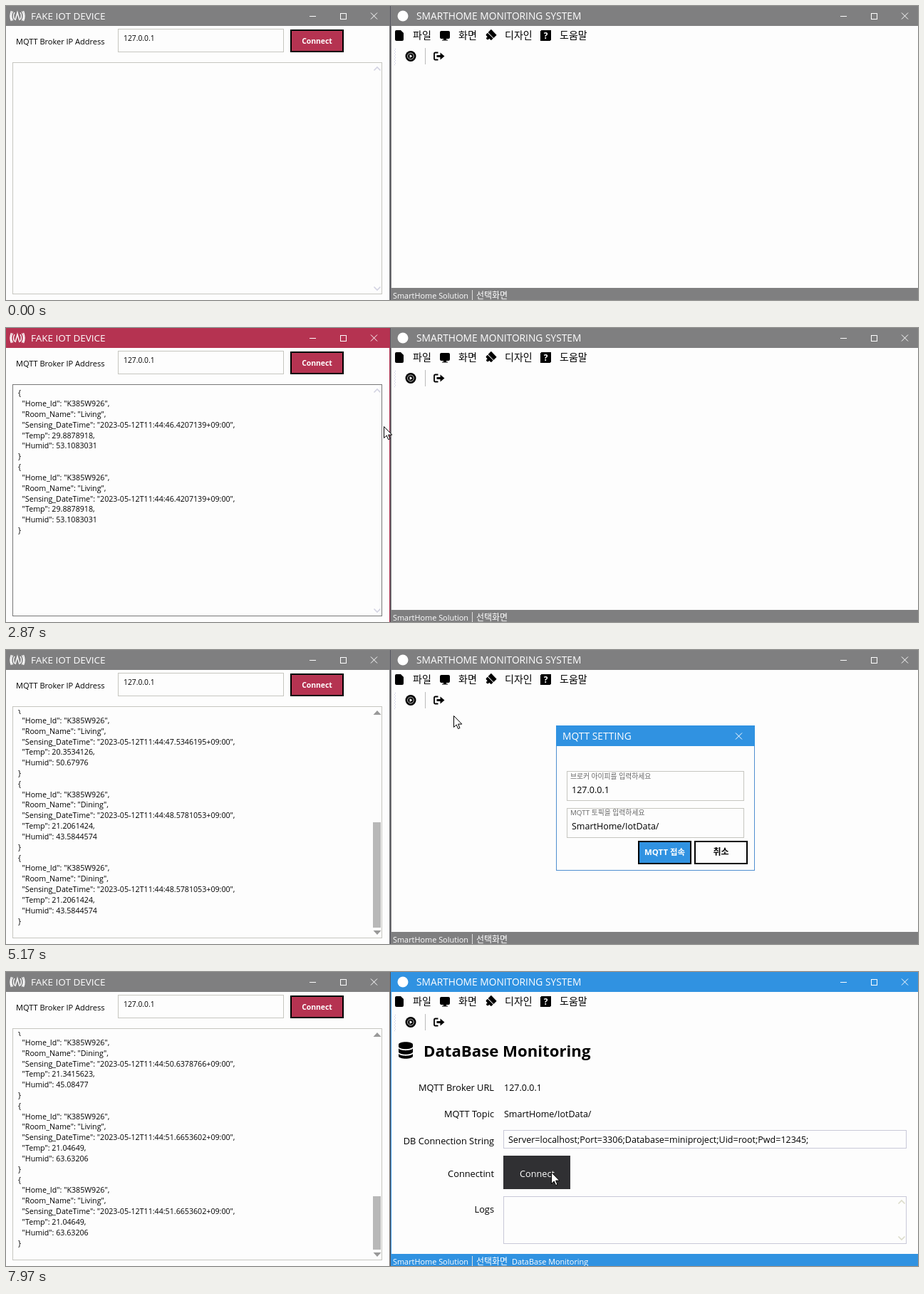
Write an HTML page that moves like this. It is 1280 by 413 pixels and loops after 8000 ms.

```html
<!DOCTYPE html>
<html lang="ko">
<head>
<meta charset="utf-8">
<title>IoT device and monitor</title>
<style>
  html, body { margin: 0; height: 100%; overflow: hidden; background: #fdfdfd; }
  svg { display: block; width: 100vw; height: 100vh; font-family: "Open Sans", "Noto Sans CJK KR", "Noto Sans CJK", sans-serif; }
  text { white-space: pre; }
  rect { shape-rendering: crispEdges; }
  .field { fill: #fdfdfd; stroke: #c6c6c0; }
  .pale { fill: #fdfdfd; stroke: #c9c9d8; }
  .line { fill: none; stroke: #fff; }
  .white { fill: #fff; }
  .title { fill: #fff; font-size: 13.75px; }
  .menu { font-size: 14px; }
  .status { fill: #fff; font-size: 10.9px; }
  .hint { fill: #666; font-size: 9.8px; }
  .form { font-size: 12.8px; text-anchor: end; }
  .value { font-size: 12.5px; }
  .bold { font-weight: 700; text-anchor: middle; }
  .thick { stroke: #000; stroke-width: 2; }
</style>
</head>
<body>
<svg viewBox="0 0 1280 413" preserveAspectRatio="none">
  <defs>
    <clipPath id="logClip"><rect x="10" y="84" width="504" height="319"/></clipPath>
    <pattern id="dots" width="3" height="4" patternUnits="userSpaceOnUse">
      <path d="M0 0h1v1h-1zM2 2h1v1h-1z" fill="#c4c4e0"/>
    </pattern>
    <g id="close"><path class="line" d="M-4.5 -4.5l9 9m0 -9l-9 9"/></g>
    <g id="controls">
      <path class="line" d="M426 14.5h9M469.5 10.5h8v8h-8z" shape-rendering="crispEdges"/>
      <use href="#close" x="516.5" y="14"/>
    </g>
    <g id="play">
      <circle r="7.5"/>
      <circle r="4.4" fill="none" stroke="#fff" stroke-width=".8"/>
      <path class="white" d="M-1.4 -2.4L2.4 0L-1.4 2.4z"/>
    </g>
    <g id="exit">
      <path d="M-1 -5h-4q-1.5 0 -1.5 1.5v7q0 1.5 1.5 1.5h4" fill="none" stroke="#000" stroke-width="1.8"/>
      <path d="M-3 -1.5H2V-5L8 0L2 5V1.5H-3z"/>
    </g>
    <path id="chevron" d="M-4.5 2.5L0 -2L4.5 2.5" fill="none" stroke-width="1.6"/>
    <path id="arrow" d="M-5.5 3L0 -3L5.5 3z" fill="#999"/>
  </defs>

  <!-- device window -->
  <rect id="leftBar" width="539" height="28"/>
  <g class="line" stroke-width="1.4">
    <path d="M13 20L16 9L19 20"/>
    <path d="M12 9q-3 5 0 10M9.5 7.5q-4 6.5 0 13M7.5 7q-3 7 0 14M20 9q3 5 0 10M22.5 7.5q4 6.5 0 13M24.5 7q3 7 0 14"/>
  </g>
  <text class="title" style="font-size:13.5px" x="35" y="19">FAKE IOT DEVICE</text>
  <use href="#controls"/>
  <text x="14" y="54" font-size="11">MQTT Broker IP Address</text>
  <rect class="field" x="157.5" y="32.5" width="232" height="32"/>
  <text x="165" y="49" font-size="10.3">127.0.0.1</text>
  <rect id="connect" class="thick" x="400" y="34" width="73" height="30"/>
  <text class="white bold" x="436.5" y="53" font-size="10.4">Connect</text>
  <rect id="logBox" class="field" x="9.5" y="79.5" width="518" height="325"/>
  <g clip-path="url(#logClip)"><g id="log" font-size="10.66"></g></g>
  <g id="idleScroll" stroke="#d3d3e2">
    <use href="#chevron" x="521" y="88"/>
    <use href="#chevron" transform="translate(521 397) scale(1 -1)"/>
  </g>
  <g id="liveScroll">
    <use href="#arrow" x="521" y="88"/>
    <use href="#arrow" transform="translate(521 397) scale(1 -1)"/>
    <rect id="thumb" x="515" width="11" fill="#b8b8b8"/>
  </g>

  <!-- monitoring window -->
  <rect id="leftEdge" x="538" y="28" width="1" height="385"/>
  <rect x="539" width="1" height="413" fill="#56565f"/>
  <g id="rightBars">
    <rect x="540" width="740" height="28"/>
    <rect x="540" y="28" width="1" height="385"/>
    <rect x="540" y="396" width="740" height="17"/>
  </g>
  <circle class="white" cx="557" cy="14" r="7.5"/>
  <text class="title" x="576" y="19">SMARTHOME MONITORING SYSTEM</text>
  <use href="#controls" x="745"/>
  <text class="status" x="543" y="411">SmartHome Solution</text>
  <rect x="654" y="399" width="1" height="14" fill="#ddd"/>
  <text class="status" style="font-size:12px" x="660" y="411">선택화면</text>

  <rect id="menuHot" x="541.5" y="29.5" width="62" height="25" fill="#dadada" stroke="#a0a0a0"/>
  <path d="M546 36q0 -2 2 -2h6l4 4v9q0 2 -2 2h-8q-2 0 -2 -2z"/>
  <path d="M611 35h10q2 0 2 2v7q0 2 -2 2h-3v1.5h2v1h-8v-1h2v-1.5h-3q-2 0 -2 -2v-7q0 -2 2 -2z"/>
  <g transform="translate(680.5 41) rotate(45)">
    <path d="M-5.5 -6h11v6h-11zM-5.5 1h11v2.5q0 1.5 -1.5 1.5h-2.2v2.5q-1.8 1.5 -3.6 0v-2.5h-2.2q-1.5 0 -1.5 -1.5z"/>
  </g>
  <rect x="750" y="34" width="15" height="15" rx="2"/>
  <text class="white bold" x="757.5" y="46" font-size="12">?</text>
  <g class="menu">
    <text x="571" y="46">파일</text><text x="635" y="46">화면</text>
    <text x="700" y="46">디자인</text><text x="777" y="46">도움말</text>
  </g>
  <rect x="545" y="60" width="3" height="23" fill="url(#dots)"/>
  <use href="#play" x="568" y="70.5"/>
  <rect x="588" y="59" width="1" height="23" fill="#bbb"/>
  <use href="#exit" x="607.5" y="70.5"/>

  <g id="popup">
    <rect x="544" y="57" width="95" height="72" fill="#000" opacity=".18"/>
    <rect x="542.5" y="54.5" width="94" height="72" fill="#fdfdfd" stroke="#8795c4"/>
    <rect x="543" y="55" width="93" height="29" fill="#dadada"/>
    <use href="#play" x="553" y="69"/>
    <text class="menu" x="570" y="74">시작</text>
    <rect x="567" y="91" width="63" height="1" fill="#d4d4d4"/>
    <use href="#exit" x="553" y="113"/>
    <text class="menu" x="570" y="118">끝내기</text>
  </g>

  <g id="dialog">
    <rect x="772.5" y="106.5" width="278" height="203" fill="#fdfdfd" stroke="#4f8fd0"/>
    <rect x="772" y="106" width="279" height="29" fill="#3092e1"/>
    <text class="title" x="781" y="126">MQTT SETTING</text>
    <use href="#close" x="1028.5" y="121"/>
    <rect id="ipBox" class="field" x="787.5" y="170.5" width="248" height="41"/>
    <text class="hint" x="792" y="181">브로커 아이피를 입력하세요</text>
    <text class="value" x="794" y="201">127.0.0.1</text>
    <rect id="topicBox" class="field" x="787.5" y="222.5" width="248" height="41"/>
    <text class="hint" x="792" y="232">MQTT 토픽을 입력하세요</text>
    <text class="value" x="794" y="252">SmartHome/IotData/</text>
    <rect class="thick" x="888" y="269" width="73" height="31" fill="#3092e1"/>
    <text class="white bold" x="924.5" y="288" font-size="11.4">MQTT 접속</text>
    <rect class="thick" x="967" y="269" width="73" height="31" fill="#fdfdfd"/>
    <text class="bold" x="1003.5" y="288" font-size="12">취소</text>
  </g>

  <g id="view">
    <path d="M551 102c0 -5 20 -5 20 0v2.5c0 5 -20 5 -20 0zM551 107.5c3 3.5 17 3.5 20 0v4.5c0 5 -20 5 -20 0zM551 115c3 3.5 17 3.5 20 0v3c0 5 -20 5 -20 0z"/>
    <text x="586" y="119" font-size="22.2" font-weight="700">DataBase Monitoring</text>
    <g class="form">
      <text x="685" y="166.5">MQTT Broker URL</text>
      <text x="685" y="203.5">MQTT Topic</text>
      <text x="685" y="241.5">DB Connection String</text>
      <text x="685" y="287.5">Connectint</text>
      <text x="685" y="337.5">Logs</text>
    </g>
    <text class="value" x="699" y="166.5">127.0.0.1</text>
    <text class="value" x="699" y="203.5">SmartHome/IotData/</text>
    <rect class="pale" x="698.5" y="222.5" width="565" height="25"/>
    <text class="value" x="705" y="240">Server=localhost;Port=3306;Database=miniproject;Uid=root;Pwd=12345;</text>
    <rect id="dbButton" x="698" y="258" width="94" height="47"/>
    <text id="dbLabel" x="745.5" y="287.5" font-size="12.7" text-anchor="middle">Connect</text>
    <rect class="pale" x="698.5" y="315.5" width="565" height="66"/>
    <g stroke="#dcdccb" transform="translate(1257 323)">
      <use href="#chevron"/><use href="#chevron" transform="translate(0 51) scale(1 -1)"/>
    </g>
    <text class="status" x="710" y="411">DataBase Monitoring</text>
  </g>

  <path id="cursor" d="M.5 .5V16.5L4.2 13L6.6 18.6L9 17.6L6.6 12.1H11.8Z" fill="#fff" stroke="#000"/>
</svg>
<script>
const $ = id => document.getElementById(id);
const LOOP = 8000, LINE = 14.83, VIEW = 319, TRACK = 296;
const GRAY = '#7f7f80', BLUE = '#3092e1', RED = '#b53351';

// room, seconds, temperature, humidity; every reading is logged twice
const readings = [
  ['Living', '46.4207139', '29.8878918', '53.1083031'],
  ['Living', '47.5346195', '20.3534126', '50.67976'],
  ['Dining', '48.5781053', '21.2061424', '43.5844574'],
  ['Living', '49.6062393', '21.8915253', '50.6688538'],
  ['Dining', '50.6378766', '21.3415623', '45.08477'],
  ['Living', '51.6653602', '21.04649', '63.63206']
];
const arrival = seconds => 2080 + (seconds - 46.4207139) * 1000;

const blocks = readings.map(([room, seconds, temp, humid], i) => {
  const lines = ['{', '  "Home_Id": "K385W926",', `  "Room_Name": "${room}",`,
    `  "Sensing_DateTime": "2023-05-12T11:44:${seconds}+09:00",`,
    `  "Temp": ${temp},`, `  "Humid": ${humid}`, '}'];
  const group = document.createElementNS('http://www.w3.org/2000/svg', 'g');
  group.innerHTML = [...lines, ...lines].map((line, n) =>
    `<text x="17" y="${84 + 11.3 + (i * 14 + n) * LINE}">${line}</text>`).join('');
  $('log').append(group);
  return group;
});

// time, x, y
const path = [
  [1000, 620, 413], [1750, 445, 53], [2450, 445, 53], [2870, 530, 138],
  [3750, 577, 40], [4150, 577, 40], [4500, 587, 64], [5030, 587, 64],
  [5570, 832, 232], [5820, 912, 278], [6600, 912, 278], [7100, 968, 388],
  [7750, 765, 281], [8000, 765, 281]
];

function cursorAt(t) {
  const i = path.findIndex(p => p[0] > t);
  if (i < 1) return path[0].slice(1);
  const [a, b] = [path[i - 1], path[i]];
  const k = (t - a[0]) / (b[0] - a[0]), e = k * k * (3 - 2 * k);
  return [a[1] + (b[1] - a[1]) * e, a[2] + (b[2] - a[2]) * e];
}

const show = (id, on) => $(id).style.display = on ? '' : 'none';
const fill = (id, color) => $(id).style.fill = color;

function draw(t) {
  const within = (from, to) => t >= from && t < to;
  const [x, y] = cursorAt(t);
  const over = (id, pad = 0) => {
    const b = $(id), n = k => +b.getAttribute(k);
    return t >= 1000 && x >= n('x') - pad && x <= n('x') + n('width') + pad &&
      y >= n('y') - pad && y <= n('y') + n('height') + pad;
  };

  const left = within(1960, 4050) ? RED : GRAY;
  fill('leftBar', left);
  fill('leftEdge', left);
  fill('rightBars', within(4050, 4900) || t >= 5900 ? BLUE : GRAY);
  fill('connect', within(1880, 1990) ? '#742038' : over('connect') ? '#a03a54' : RED);

  const count = readings.filter(r => t >= arrival(r[1])).length;
  blocks.forEach((b, i) => b.style.display = i < count ? '' : 'none');
  const height = (count * 14 + 1) * LINE, scrolls = height > VIEW;
  $('log').setAttribute('transform', `translate(0 ${Math.min(0, VIEW - height)})`);
  show('idleScroll', !scrolls);
  show('liveScroll', scrolls);
  const thumb = Math.min(TRACK, TRACK * VIEW / height);
  $('thumb').setAttribute('y', 390 - thumb);
  $('thumb').setAttribute('height', thumb);

  show('menuHot', within(3700, 4780));
  show('popup', within(4100, 4780));
  show('dialog', within(4900, 5900));
  show('view', t >= 6270);
  for (const id of ['logBox', 'ipBox', 'topicBox'])
    $(id).style.stroke = over(id, 3) ? '#777' : '';

  const pressed = t >= 7940;
  fill('dbButton', pressed ? '#303033' : over('dbButton') ? '#bdbdbd' : '#d2d2d3');
  fill('dbLabel', pressed ? '#fff' : '#222');

  show('cursor', t >= 1000);
  $('cursor').setAttribute('transform', `translate(${Math.round(x)} ${Math.round(y)})`);
}

function tick() {
  draw(performance.now() % LOOP);
  requestAnimationFrame(tick);
}
tick();
</script>
</body>
</html>
```
